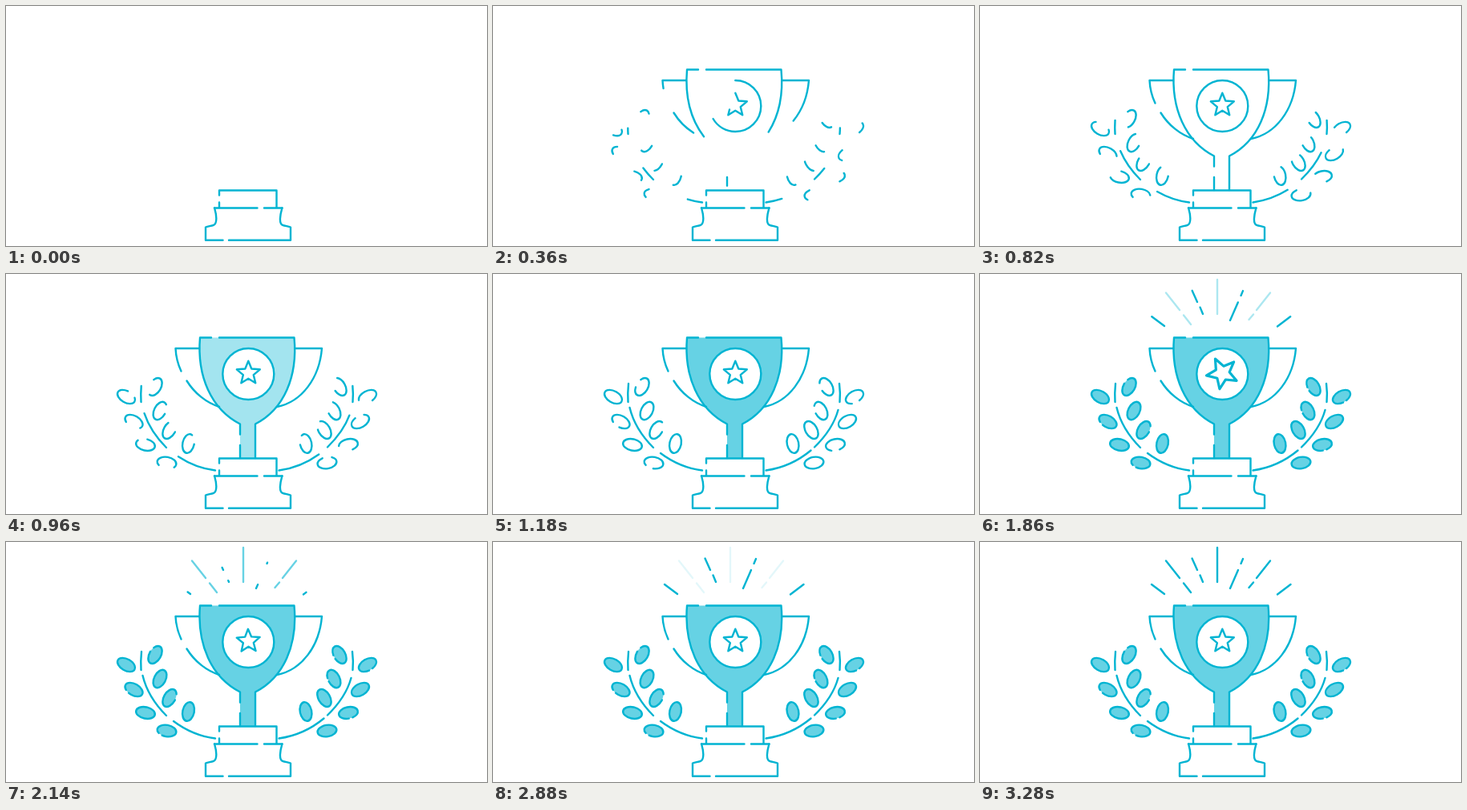
An HTML page for the animation above (4800 ms loop, 600 by 300 pixels).

```html
<!DOCTYPE html>
<html lang="en">
<head>
<meta charset="utf-8">
<title>Trophy</title>
<style>
html, body { margin: 0; height: 100%; overflow: hidden; background: #fff; }
svg { display: block; width: 100vw; height: 100vh; fill: none; stroke: #00b4d2; stroke-width: 2.4; stroke-linecap: round; stroke-linejoin: round; }
.fill { fill: #00b4d2; stroke: none; }
</style>
</head>
<body>
<svg id="stage" viewBox="0 0 600 300">
  <g id="base">
    <path d="M266 236.500V230.500H337.500V252M266 245.500V252M260 252.500H313.500M322 252.500H344.500"/>
    <path d="M260 252.500C263 262 263.500 272 259 273.800C256 275 252 275.300 249 276.500V292.700H270.500M278 292.700H355V276.500C352 275.300 348 275 345 273.800C340.500 272 341.500 262 344.500 252.500"/>
  </g>
  <path id="cupFill" class="fill" d="M242 79.500H359.500C364 128 347 169 311 187.500V230.500H292V187.500C256 169 238 128 242 79.500Z"/>
  <circle id="disc" cx="302.300" cy="125" r="32" fill="#fff" stroke="none"/>
  <g id="leafFills"></g>
  <g id="lines"></g>
  <g id="flash">
    <path d="M232 23.500L249 45M254 51.500L263 63M296 7V50M362 23.500L345 45M341 50.500L335.500 57"/>
  </g>
</svg>
<script>
const LOOP = 4800;
const byId = id => document.getElementById(id);
const clamp = x => Math.max(0, Math.min(1, x));
const ramp = (t, a, b) => clamp((t - a) / (b - a));

function add(parent, tag, attrs) {
  const el = document.createElementNS('http://www.w3.org/2000/svg', tag);
  for (const k in attrs) el.setAttribute(k, attrs[k]);
  return byId(parent).appendChild(el);
}
const strokes = list => list.map(d => add('lines', 'path', { d, pathLength: 1 }));

function reveal(el, p, gap = 2) {
  el.style.visibility = p > 0 ? 'visible' : 'hidden';
  el.style.strokeDasharray = `${p} ${gap}`;
}

const cup = strokes([
  'M266 79.5H359.500C364 128 347 169 311 187.500V230',
  'M256 79.5H242C238 128 256 169 292 187.500V200.500',
  'M292 214V230',
  'M241 93H211.500C212 104 214.500 113 218.500 121.500',
  'M225.500 133.500C235 149 250 161 266 166',
  'M361 93H394C391 130 369 160 338 166',
  'M302.300 93a32 32 0 1 1 0 64a32 32 0 1 1 0 -64'
]);

const stems = strokes([
  'M168.500 160Q167.800 149 169 137',
  'M200 217Q177 194 170.500 167',
  'M261 245.500Q233 242 209 224',
  'M432.500 160Q433.500 149 432 137',
  'M401 216.500Q424 194 430.500 170',
  'M340.500 245.500Q372 241 396.500 220.500'
]);

const rays = strokes([
  'M278 50L274.500 41.500', 'M271 35L264.500 20.500', 'M230 65L214 53',
  'M312 58L322 35', 'M325.500 27L328 21', 'M371 65.500L387.500 53'
]);

// x, y, tilt, start angle, drawn share; the right branch runs the other way round
const leaves = [
  [150, 153.5, 30, -30, 1], [186, 141, -60, -49, .9],
  [159.5, 184.5, 30, 140, .92], [192, 171, -63, 94, 1],
  [174, 213.5, 12, -85, 1], [204, 195, -60, 82, .88],
  [200.5, 236, 10, 147, .92], [227.5, 212, -78, 85, 1],
  [451, 153.5, -30, 72, .92], [416, 141, 60, 80, .92],
  [442, 184.5, -30, -110, 1], [409, 171, 63, 90, .93],
  [427, 213.5, -12, 66, .92], [397, 195, 60, 116, 1],
  [400.5, 236, -10, -118, 1], [374, 212, 78, 90, 1]
].map(([x, y, tilt, start, share]) => {
  const dir = x < 300 ? 1 : -1;
  const attrs = { rx: 12, ry: 7.2, transform: `translate(${x} ${y}) rotate(${tilt}) scale(1 ${dir})` };
  add('leafFills', 'ellipse', { ...attrs, class: 'fill' });
  const el = add('lines', 'ellipse', { ...attrs, pathLength: 1 });
  el.style.strokeDashoffset = -((dir * start + 360) % 360) / 360;
  return { el, share };
});

const points = Array.from({ length: 10 }, (_, i) => {
  const r = i % 2 ? 6.8 : 15.2, a = (i / 5 - .5) * Math.PI;
  return `${r * Math.cos(a)},${r * Math.sin(a)}`;
}).join(' ');
const star = add('lines', 'polygon', { points, pathLength: 1 });

function flashLevel(t) {
  return t < 2560 ? ramp(t, 1520, 2560) : clamp(Math.abs(t - 2920) / 360);
}

function draw(t) {
  const cupShare = ramp(t, 0, 540);
  cup.forEach(el => reveal(el, cupShare));
  reveal(star, cupShare);
  stems.forEach(el => reveal(el, ramp(t, 0, 1100)));
  for (const { el, share } of leaves) {
    const p = share * ramp(t, 60, share < 1 ? 1300 : 1180);
    reveal(el, p, 1 - p);
  }
  byId('cupFill').style.opacity = .6 * ramp(t, 840, 1040);
  byId('leafFills').style.opacity = .6 * ramp(t, 1180, 1300);

  const spin = ramp(t, 1520, 2560);
  const size = 1 + .36 * Math.sin(Math.PI * ramp(t, 1520, 2040));
  star.setAttribute('transform', `translate(302.300 124) rotate(${360 * spin}) scale(${size})`);

  // out, back and out again
  const swing = 3 * spin;
  const reach = swing < 2 ? 1 - Math.abs(1 - swing) : swing - 2;
  rays.forEach((el, i) => reveal(el, i || t < 1519 ? reach : Math.max(reach, .001)));
  byId('flash').style.opacity = flashLevel(t);
}

let begin;
function tick(now) {
  begin ??= now;
  draw((now - begin) % LOOP);
  requestAnimationFrame(tick);
}
draw(0);
requestAnimationFrame(tick);
</script>
</body>
</html>
```
